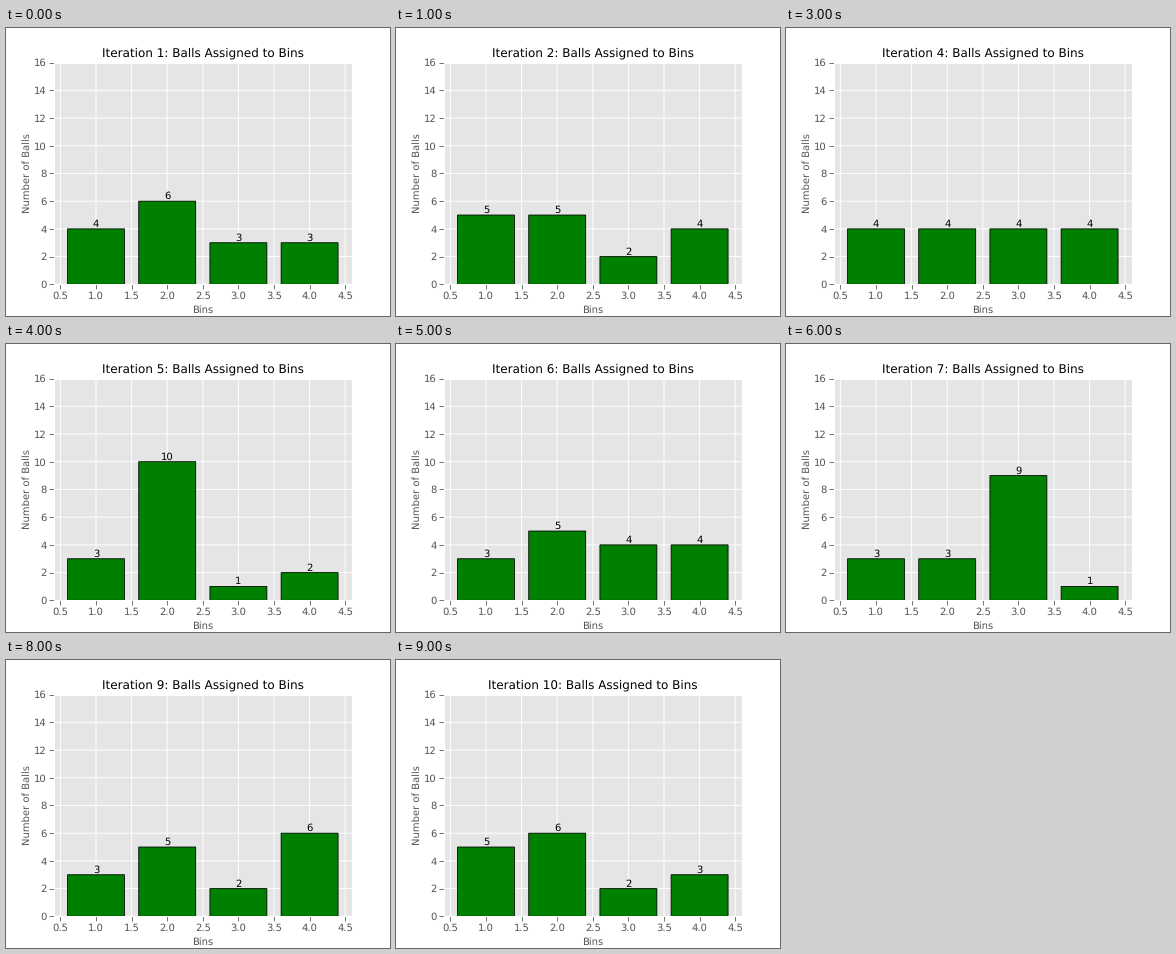
Write a matplotlib script that moves like this. It is 384 px wide and 288 px high and loops after 10000 ms.

```python
import numpy as np
import matplotlib.pyplot as plt
from matplotlib.animation import FuncAnimation

DPI = 72
GRAY = "#555555"
BALLS = 16
BINS = np.arange(1, 5)

# Balls in the first three bins per iteration; the last bin takes the rest
DRAWS = ["4 6 3", "5 5 2", "4 3 3", "4 4 4", "3 10 1",
         "3 5 4", "3 3 9", "4 5 2", "3 5 2", "5 6 2"]

plt.rcParams.update({
    "font.family": "DejaVu Sans",
    "font.size": 10,
    "text.hinting": "none",
    "axes.facecolor": "#E5E5E5",
    "axes.edgecolor": "white",
    "axes.linewidth": 1,
    "axes.labelcolor": GRAY,
    "axes.axisbelow": True,
    "axes.grid": True,
    "grid.color": "white",
    "grid.linewidth": 1,
    "xtick.color": GRAY,
    "ytick.color": GRAY,
})


def counts(i):
    first = [int(n) for n in DRAWS[i].split()]
    return first + [BALLS - sum(first)]


fig, ax = plt.subplots(figsize=(384 / DPI, 288 / DPI), dpi=DPI)
fig.patch.set_facecolor("white")

bars = ax.bar(BINS, counts(0), color="green", edgecolor="black", linewidth=0.8)
labels = [ax.text(x, 0, "", ha="center", va="bottom") for x in BINS]
title = ax.set_title("", fontsize=12)
ax.set_xlabel("Bins")
ax.set_ylabel("Number of Balls", labelpad=2)
ax.set(xlim=(0.41, 4.59), ylim=(0, BALLS),
       xticks=np.arange(0.5, 5, 0.5), yticks=range(0, BALLS + 1, 2))
ax.tick_params(length=5, pad=2, width=0.8)

# Keep edges and grid lines at their true sub-pixel positions
for artist in [*bars, *ax.get_xgridlines(), *ax.get_ygridlines()]:
    artist.set_snap(False)


def update(i):
    for bar, label, n in zip(bars, labels, counts(i)):
        bar.set_height(n)
        label.set_y(n)
        label.set_text(str(n))
    title.set_text(f"Iteration {i + 1}: Balls Assigned to Bins")
    return [*bars, *labels, title]


anim = FuncAnimation(fig, update, frames=len(DRAWS), interval=1000,
                     init_func=lambda: update(0), repeat=True, blit=False)

plt.show()
```
